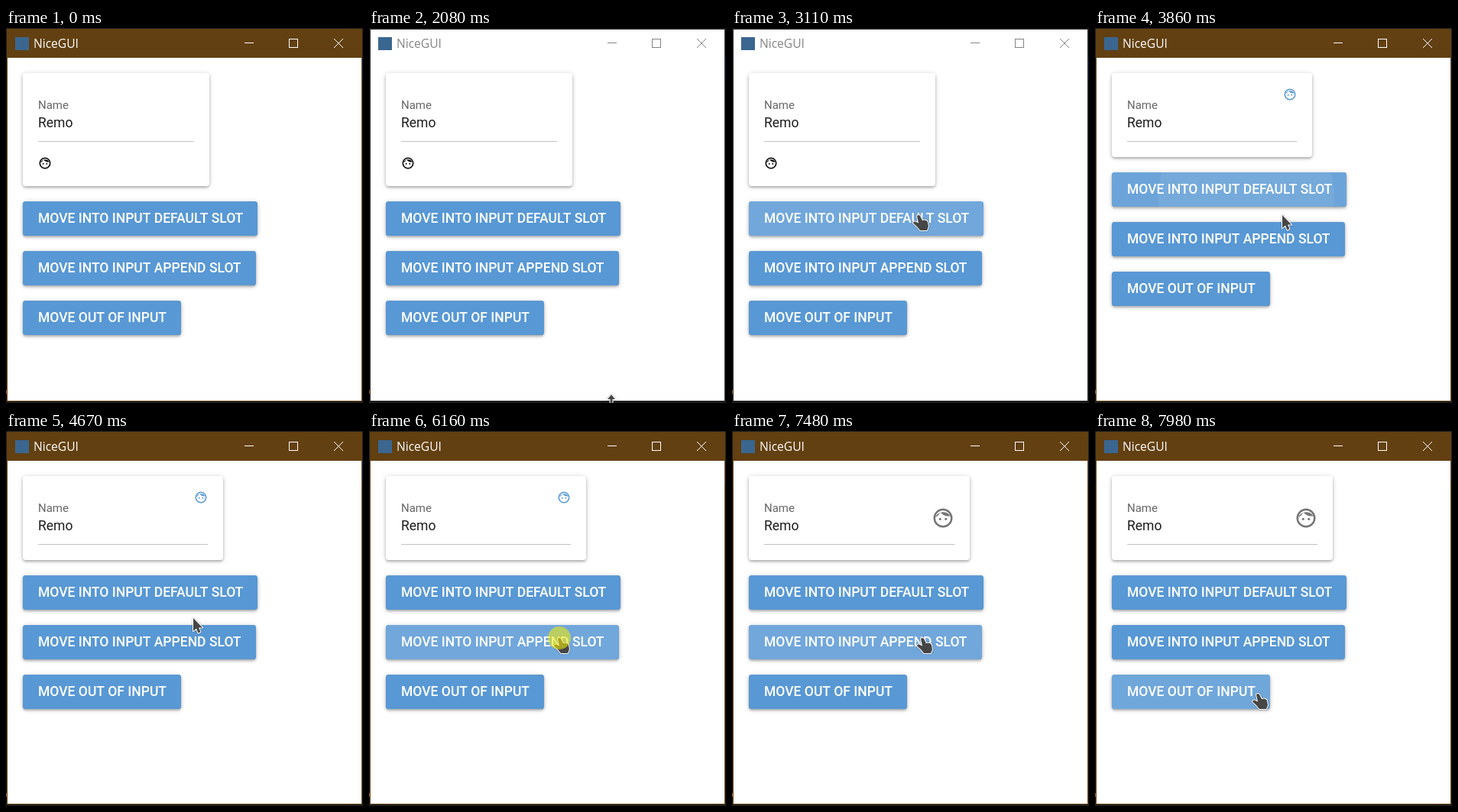
Animation of 467 by 491 pixels, one loop 8 s. Source, as an HTML page with a canvas:

```html
<!DOCTYPE html>
<html lang="en">
<head>
<meta charset="utf-8">
<title>Moving an icon between slots</title>
<style>
  html, body { margin: 0; width: 100%; height: 100%; overflow: hidden; background: #1e1e1e; }
  canvas { display: block; width: 467px; height: 491px; }
</style>
</head>
<body>
<canvas id="stage"></canvas>
<script>
const LOOP = 8000, WIDTH = 467, HEIGHT = 491;
const canvas = document.getElementById('stage');
const ctx = canvas.getContext('2d');
const dpr = window.devicePixelRatio || 1;
canvas.width = WIDTH * dpr;
canvas.height = HEIGHT * dpr;

const BLUE = '#5898d4', BROWN = '#624011';
const BLUR_AT = 210;
const FIRST_CLICK = 3670, FIRST_MOVE = 3830;
const SECOND_CLICK = 6160, SECOND_MOVE = 6310;
const PRESS = 120;

const buttons = [
  { text: 'MOVE INTO INPUT DEFAULT SLOT', width: 307, hovers: [[2669, FIRST_MOVE]], click: FIRST_CLICK },
  { text: 'MOVE INTO INPUT APPEND SLOT', width: 305, hovers: [[2518, 2609], [4745, 7627]], click: SECOND_CLICK },
  { text: 'MOVE OUT OF INPUT', width: 207, hovers: [[7692, LOOP]] }
];

const layouts = {
  below:   { card: [244, 148], icon: [51, 177, 18, '#000'], top: 227 },
  inside:  { card: [262, 110], icon: [255, 87, 18, BLUE], top: 189 },
  append:  { card: [289, 110], icon: [276, 114, 30, '#757575'], top: 189 }
};

// Pointer moves: start, end, from, to
const moves = [
  [2080, 2830, [317, 490], [245, 245]],
  [4670, 4860, [245, 245], [250, 271]],
  [7480, 7830, [250, 271], [214, 344]]
];

const hairPath = new Path2D('M4 11.14C6.41 10.09 8.28 8.16 9.26 5.77C11.07 8.33 14.05 10 17.42 10c.78 0 1.53-.09 2.25-.26A9 9 0 0 0 4 11.14z');
const pointers = {
  arrow: new Path2D('M0 0V17L4 13.5L6.5 19.5L9.5 18L7 12.5H12Z'),
  hand: new Path2D('M-3 1Q-1-1 1 1L4 7L7 6.5Q10 6.5 11 9L12 15L10 20H1L-3 15L-8 10.5Q-8 8-5 8.5L-1 10.5Z'),
  resize: new Path2D('M0-10L5-4H1.5V4H5L0 10L-5 4H-1.5V-4H-5Z')
};

const clamp = u => Math.min(1, Math.max(0, u));
const smooth = u => { u = clamp(u); return u * u * (3 - 2 * u); };
const easeOut = u => 1 - (1 - clamp(u)) ** 3;

function rect(x, y, w, h, color) {
  ctx.fillStyle = color;
  ctx.fillRect(x, y, w, h);
}

function text(value, x, y, font, color) {
  ctx.font = font;
  ctx.fillStyle = color;
  ctx.fillText(value, x, y);
}

function raised(x, y, w, h, color) {
  ctx.beginPath();
  ctx.roundRect(x, y, w, h, 4);
  ctx.fillStyle = color;
  for (const [offset, blur, alpha] of [[1, 6, .2], [2, 3, .22]]) {
    ctx.save();
    ctx.shadowColor = `rgba(0,0,0,${alpha})`;
    ctx.shadowBlur = blur * dpr;
    ctx.shadowOffsetY = offset * dpr;
    ctx.fill();
    ctx.restore();
  }
}

function drawWindow(active) {
  rect(0, 0, WIDTH, HEIGHT, '#1e1e1e');
  rect(466, 38, 1, 30, '#1c2450');
  rect(0, 474, 1, 5, '#a87430');
  rect(1, 1, 465, 488, active ? BROWN : '#1e1e1e');
  rect(2, active ? 39 : 2, 463, active ? 449 : 486, '#fff');

  rect(12, 12, 18, 17, '#3a6690');
  const ink = active ? '#fff' : '#858585';
  text('NiceGUI', 36, 26, '15.6px "Open Sans", sans-serif', ink);
  ctx.strokeStyle = ink;
  ctx.lineWidth = 1;
  ctx.strokeRect(370.5, 14.5, 11, 11);
  ctx.beginPath();
  ctx.moveTo(312, 19.5); ctx.lineTo(324, 19.5);
  ctx.moveTo(429, 14); ctx.lineTo(441, 26);
  ctx.moveTo(441, 14); ctx.lineTo(429, 26);
  ctx.stroke();
}

function drawFace(x, y, size, color) {
  ctx.save();
  ctx.translate(x - size / 2, y - size / 2);
  ctx.scale(size / 24, size / 24);
  ctx.fillStyle = ctx.strokeStyle = color;
  ctx.lineWidth = 2;
  ctx.beginPath();
  ctx.arc(12, 12, 9, 0, 7);
  ctx.stroke();
  ctx.fill(hairPath);
  for (const eye of [9, 15]) {
    ctx.beginPath();
    ctx.arc(eye, 13, 1.25, 0, 7);
    ctx.fill();
  }
  ctx.restore();
}

function drawCard({ card: [w, h], icon }) {
  raised(22, 59, w, h, '#fff');
  text('Name', 42, 106, '15px Roboto, sans-serif', '#666');
  text('Remo', 42, 130, '17.5px Roboto, sans-serif', '#1d1d1d');
  rect(42, 148, w - 40, 1, '#c2c2c2');
  drawFace(...icon);
}

function drawRipple(button, y, t, [px, py]) {
  const age = t - button.click - PRESS;
  if (!(age > 0 && age < 480)) return;
  const grow = easeOut(age / 225);
  const full = Math.hypot(button.width, 45) / 2;
  const x = px + (22 + button.width / 2 - px) * grow;
  const cy = py + (y + 22.5 - py) * grow;
  const alpha = .2 * clamp(age / 225) * (1 - easeOut((age - 230) / 250));
  ctx.save();
  ctx.beginPath();
  ctx.roundRect(22, y, button.width, 45, 4);
  ctx.clip();
  ctx.beginPath();
  ctx.arc(x, cy, full * (.2 + .8 * grow), 0, 7);
  ctx.fillStyle = `rgba(255,255,255,${alpha})`;
  ctx.fill();
  ctx.restore();
}

function drawButton(button, y, t, pointer) {
  raised(22, y, button.width, 45, BLUE);
  const hover = button.hovers.reduce((sum, [on, off]) =>
    sum + easeOut((t - on) / 400) - easeOut((t - off) / 400), 0);
  ctx.beginPath();
  ctx.roundRect(22, y, button.width, 45, 4);
  ctx.fillStyle = `rgba(255,255,255,${.15 * hover})`;
  ctx.fill();
  drawRipple(button, y, t, pointer);
  text(button.text, 42, y + 28, '500 17.5px Roboto, sans-serif', '#fff');
}

function pointerAt(t) {
  let position = moves[0][2];
  for (const [start, end, from, to] of moves) {
    if (t < start) break;
    const u = smooth((t - start) / (end - start));
    position = from.map((v, i) => v + (to[i] - v) * u);
  }
  return position;
}

function drawPointer(t, [x, y]) {
  if (t < moves[0][0]) return;
  const hovering = buttons.some(b => b.hovers.some(([on, off]) => t >= on && t < off));
  const shape = pointers[y > 486 ? 'resize' : hovering ? 'hand' : 'arrow'];
  ctx.save();
  ctx.translate(x, y);
  ctx.lineJoin = 'round';
  ctx.lineWidth = 2;
  ctx.strokeStyle = '#fff';
  ctx.shadowColor = 'rgba(0,0,0,.4)';
  ctx.shadowBlur = 2 * dpr;
  ctx.stroke(shape);
  ctx.shadowColor = 'transparent';
  ctx.fillStyle = '#464646';
  ctx.fill(shape);
  ctx.restore();

  if ([FIRST_CLICK, SECOND_CLICK].some(click => t >= click && t < click + PRESS)) {
    ctx.beginPath();
    ctx.arc(x - 1, y, 15, 0, 7);
    ctx.fillStyle = 'rgba(240,235,10,.58)';
    ctx.fill();
  }
}

function draw(t) {
  ctx.setTransform(dpr, 0, 0, dpr, 0, 0);
  const layout = layouts[t < FIRST_MOVE ? 'below' : t < SECOND_MOVE ? 'inside' : 'append'];
  const pointer = pointerAt(t);
  drawWindow(t < BLUR_AT || t >= FIRST_CLICK);
  drawCard(layout);
  buttons.forEach((button, i) => drawButton(button, layout.top + 65 * i, t, pointer));
  drawPointer(t, pointer);
}

const began = performance.now();
function tick() {
  draw((performance.now() - began) % LOOP);
  requestAnimationFrame(tick);
}
tick();
</script>
</body>
</html>
```
